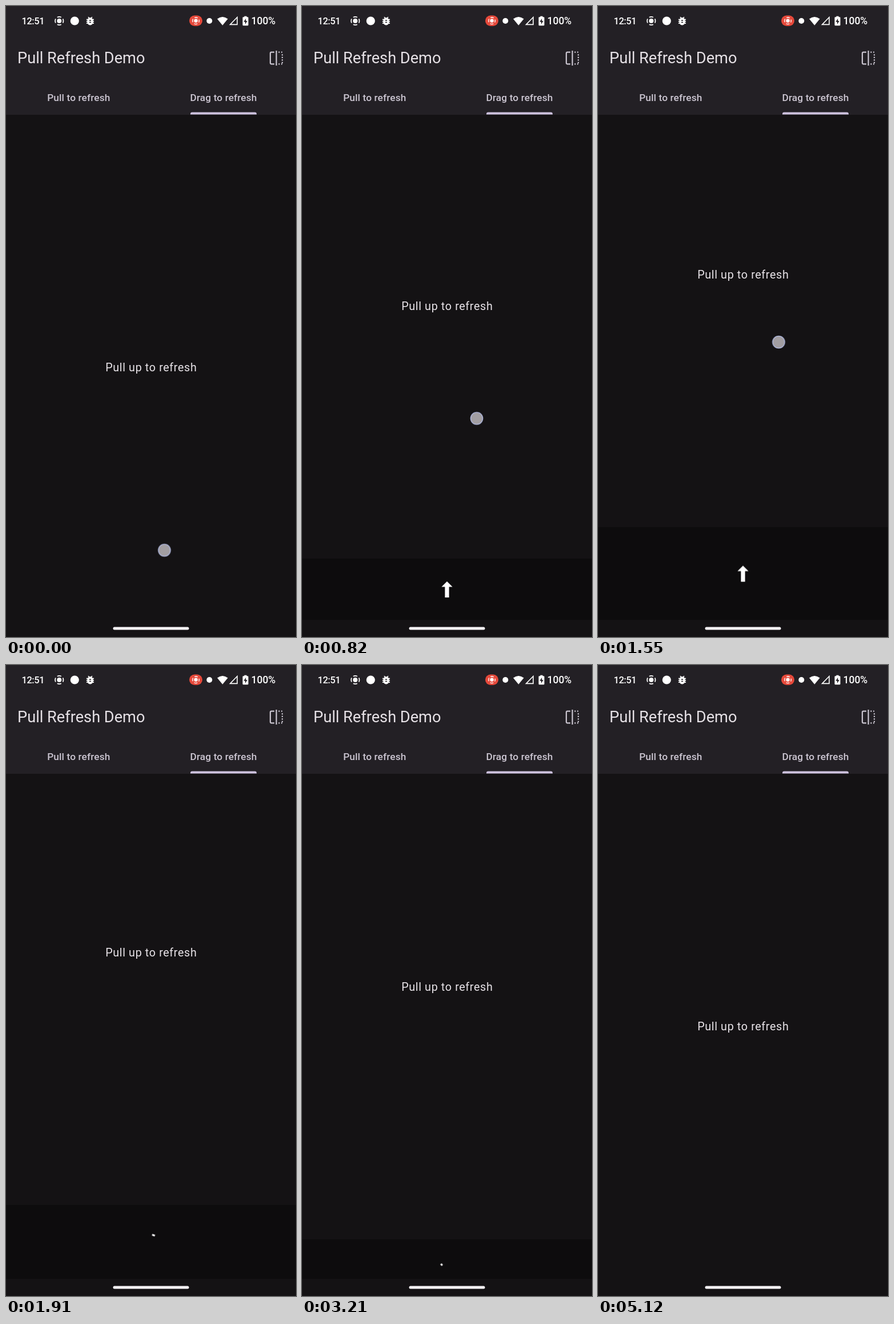
An HTML page for the animation above (5.15 s loop, 508 px wide and 1102 px high).

```html
<!DOCTYPE html>
<html lang="en">
<head>
<meta charset="utf-8">
<title>Pull Refresh Demo</title>
<style>
  html, body { margin: 0; width: 100%; height: 100%; overflow: hidden; background: #141214; }
  svg { display: block; width: 508px; height: 1102px; font-family: Roboto, sans-serif; }

  .page, .slot, .touch, .arrow, .spinner, .turn, .tail, .arc {
    animation: 5150ms linear infinite;
  }
  .page { --k: 1; animation-name: pull; }
  .slot { --k: .5; animation-name: pull; }
  .touch { animation-name: touch; }
  .arrow { animation-name: arrow; }
  .spinner { animation-name: spinner; }
  .turn { animation-name: turn; }
  .tail { animation-name: tail; }
  .arc { animation-name: arc; fill: none; stroke: #fff; stroke-width: 3.1; stroke-linecap: square; }

  /* Finger drag, release to the refresh height, return */
  @keyframes pull {
    0% { transform: translateY(0); }
    2.33% { transform: translateY(0); animation-timing-function: cubic-bezier(.3, .1, .7, .8); }
    15.92% { transform: translateY(calc(var(--k) * -107px)); animation-timing-function: cubic-bezier(.3, .45, .6, 1); }
    30.1%, 35.73% { transform: translateY(calc(var(--k) * -162px)); animation-timing-function: cubic-bezier(.3, .1, .2, 1); }
    41.55% { transform: translateY(calc(var(--k) * -69px)); }
    94.17% { transform: translateY(calc(var(--k) * -69px)); animation-timing-function: cubic-bezier(.3, .1, .2, 1); }
    99.4%, 100% { transform: translateY(0); }
  }
  @keyframes touch {
    0% { transform: translate(277.5px, 950.5px); opacity: 1; }
    2.33% { transform: translate(277.5px, 950.5px); animation-timing-function: cubic-bezier(.3, .1, .7, .8); }
    15.92% { transform: translate(306px, 720.5px); animation-timing-function: cubic-bezier(.3, .45, .6, 1); }
    30.1% { transform: translate(316.5px, 587px); }
    35.72% { transform: translate(316.5px, 587px); opacity: 1; }
    35.73%, 100% { transform: translate(316.5px, 587px); opacity: 0; }
  }
  @keyframes arrow {
    0%, 35.72% { opacity: 1; }
    35.73%, 100% { opacity: 0; }
  }
  @keyframes spinner {
    0%, 35.72% { opacity: 0; }
    35.73%, 100% { opacity: 1; }
  }

  /* Indeterminate ring: steady turn, head and tail take turns over 666 ms */
  @keyframes turn {
    from { transform: rotate(-485.1deg); }
    to { transform: rotate(620.7deg); }
  }
  @keyframes tail {
    0% { transform: rotate(0); }
    48.66% { transform: rotate(0); animation-timing-function: cubic-bezier(.4, 0, .2, 1); }
    61.59% { transform: rotate(290deg); }
    74.52% { transform: rotate(290deg); animation-timing-function: cubic-bezier(.4, 0, .2, 1); }
    87.46%, 100% { transform: rotate(580deg); }
  }
  @keyframes arc {
    0%, 35.73%, 61.59%, 87.46% { stroke-dasharray: .1 400; animation-timing-function: cubic-bezier(.4, 0, .2, 1); }
    48.66%, 74.52%, 100% { stroke-dasharray: 290 400; animation-timing-function: cubic-bezier(.4, 0, .2, 1); }
  }
</style>
</head>
<body>
<svg viewBox="0 0 508 1102">
  <defs>
    <g id="record">
      <circle r="4"/>
      <circle r="7.2" fill="none" stroke="#fff" stroke-width="1.7" pathLength="360" stroke-dasharray="58 32" stroke-dashoffset="29"/>
    </g>
  </defs>

  <rect y="180" width="508" height="892" fill="#0d0c0d"/>
  <g class="slot">
    <g transform="translate(254 1072.5)">
      <path class="arrow" fill="#fff" d="M0-14 9.6-4.4H3.6V14H-3.6V-4.4H-9.6Z"/>
      <g class="spinner"><g class="turn"><g class="tail">
        <circle class="arc" r="13.2" pathLength="360"/>
      </g></g></g>
    </g>
  </g>

  <g class="page">
    <rect y="180" width="508" height="892" fill="#141214"/>
    <text x="254.3" y="638" text-anchor="middle" font-size="19.76" letter-spacing=".62" fill="#e8e3e8">Pull up to refresh</text>
  </g>

  <rect y="1072" width="508" height="30" fill="#141214"/>
  <rect x="187.5" y="1084.5" width="133" height="5" rx="2.5" fill="#f6f2f6"/>

  <rect width="508" height="190" fill="#232025"/>
  <text x="20" y="100" font-size="27.2" fill="#e6e1e6">Pull Refresh Demo</text>
  <g font-size="17.3" font-weight="500" letter-spacing=".12" text-anchor="middle" fill="#cbc5d1">
    <text x="127.3" y="165.8">Pull to refresh</text>
    <text x="381" y="165.8">Drag to refresh</text>
  </g>
  <path d="M323 189.5V188.5Q323 185.6 326 185.6H436Q439 185.6 439 188.5V189.5Z" fill="#cdc1de"/>

  <g fill="none" stroke="#cac5d0" stroke-width="2.2">
    <path d="M470 80.7H465Q463 80.7 463 82.7V99.3Q463 101.3 465 101.3H470M473.6 78V104"/>
    <path d="M477.3 80.7H484M477.3 101.3H484" stroke-dasharray="2.2 2.6"/>
    <path d="M484 84.2V100" stroke-dasharray="2.2 2.3"/>
  </g>

  <g fill="#fff">
    <g font-weight="500">
      <text x="27.5" y="31.8" font-size="16.4" letter-spacing="-.4">12:51</text>
      <text x="429.5" y="32" font-size="17.5">100%</text>
    </g>
    <use href="#record" x="93.3" y="26"/>
    <circle cx="120.3" cy="26" r="7.6"/>
    <path transform="translate(137.6 16.2) scale(.82)" d="M20 8h-2.81c-.45-.78-1.07-1.45-1.82-1.96L17 4.41 15.59 3l-2.17 2.17C12.96 5.06 12.49 5 12 5s-.96.06-1.41.17L8.41 3 7 4.41l1.62 1.63C7.88 6.55 7.26 7.22 6.81 8H4v2h2.09c-.05.33-.09.66-.09 1v1H4v2h2v1c0 .34.04.67.09 1H4v2h2.81c1.04 1.79 2.97 3 5.19 3s4.15-1.21 5.19-3H20v-2h-2.09c.05-.33.09-.66.09-1v-1h2v-2h-2v-1c0-.34-.04-.67-.09-1H20V8zm-6 8h-4v-2h4zm0-4h-4v-2h4z"/>
    <rect x="321" y="16.5" width="23" height="18.5" rx="9.2" fill="#e5493b"/>
    <use href="#record" transform="translate(332.6 25.8) scale(.8)"/>
    <circle cx="356.3" cy="26" r="5"/>
    <path d="M370 22.6Q379.3 15.6 388.6 22.6L379.3 33.8Z"/>
    <path d="M392.6 32.4H405V19.8Z" fill="none" stroke="#fff" stroke-width="1.6"/>
    <path d="M417.4 19.2V17.8H421.6V19.2H423.2Q424.5 19.2 424.5 20.5V33Q424.5 34.3 423.2 34.3H415.8Q414.5 34.3 414.5 33V20.5Q414.5 19.2 415.8 19.2Z"/>
    <path d="M420.2 21.8 416.4 27.8H419V32L422.7 26H420.2Z" fill="#232025"/>
  </g>

  <g class="touch">
    <circle r="10.6" fill="#a29ea2" stroke="#b3bbe2" stroke-width="1.4"/>
  </g>
</svg>
</body>
</html>
```
